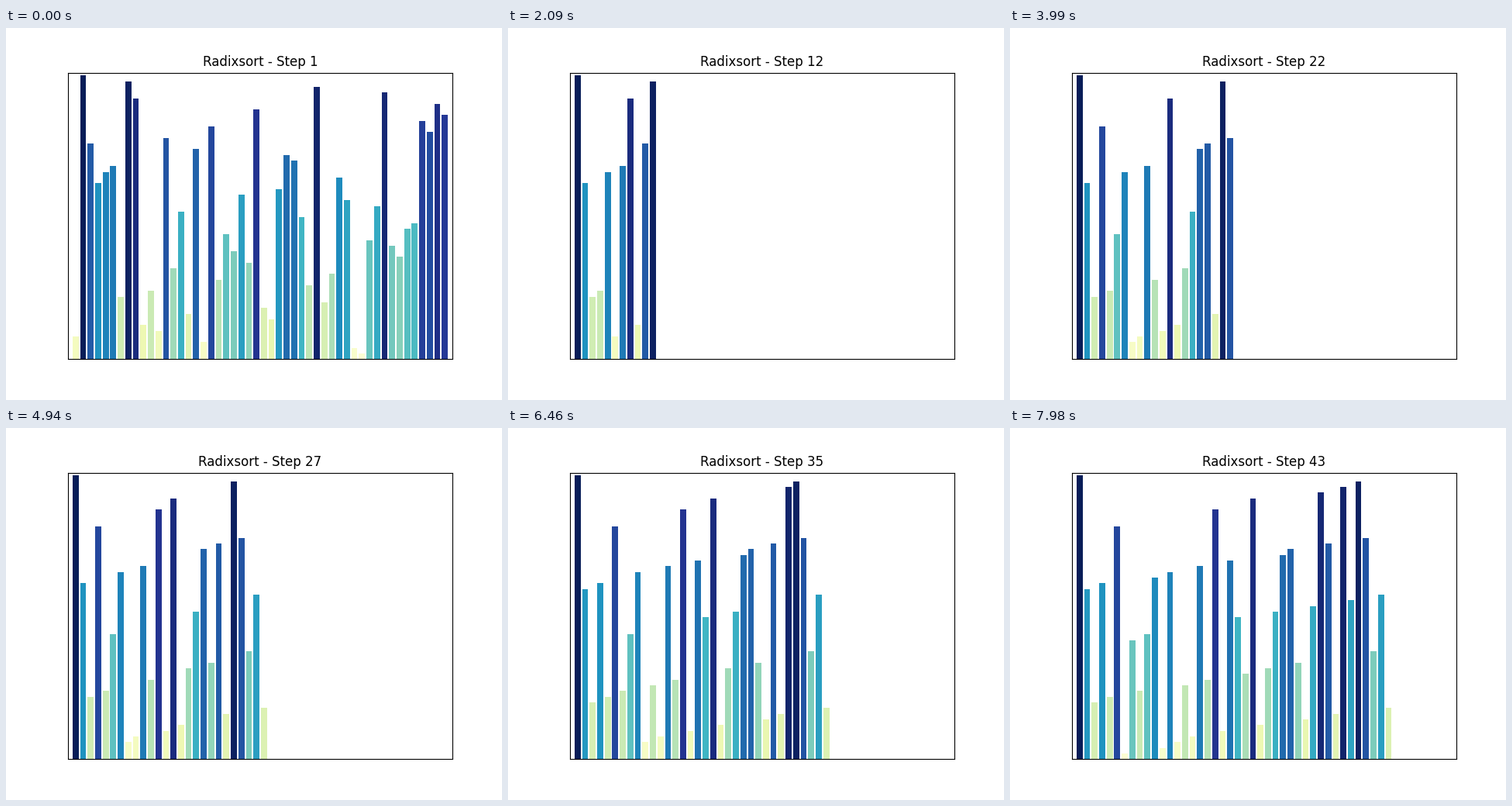
Recreate the animation shown at these times as a matplotlib script. Size 640 by 480 pixels, loop 8000 ms.

```python
import matplotlib.pyplot as plt
from matplotlib.animation import FuncAnimation

LOOP_MS = 8000
TICK_MS = 20
STEP_MS = 190

VALUES = [
    4, 50, 38, 31, 33, 34, 11, 49, 46, 6,
    12, 5, 39, 16, 26, 8, 37, 3, 41, 14,
    22, 19, 29, 17, 44, 9, 7, 30, 36, 35,
    25, 13, 48, 10, 15, 32, 28, 2, 1, 21,
    27, 47, 20, 18, 23, 24, 42, 40, 45, 43,
]
TOP = max(VALUES)
COUNT = len(VALUES)

fig, ax = plt.subplots(figsize=(6.4, 4.8), dpi=100)
ax.set(xlim=(-1, COUNT), ylim=(0, TOP * 1.01), xticks=[], yticks=[])
title = ax.set_title("")
bars = ax.bar(range(COUNT), VALUES, width=0.8)
cmap = plt.get_cmap("YlGnBu")


def bars_at(step):
    """Step 1 is the unsorted list; then one value per step joins its digit bucket."""
    if step == 1:
        return VALUES
    return sorted(VALUES[:step - 1], key=lambda v: v % 10)


def update(tick):
    step = (tick * TICK_MS + TICK_MS // 2) // STEP_MS + 1
    shown = bars_at(step)
    for i, bar in enumerate(bars):
        bar.set_visible(i < len(shown))
        if i < len(shown):
            bar.set_height(shown[i])
            bar.set_facecolor(cmap(shown[i] / TOP))
    title.set_text(f"Radixsort - Step {step}")
    return [*bars, title]


anim = FuncAnimation(fig, update, frames=LOOP_MS // TICK_MS, interval=TICK_MS,
                     init_func=lambda: update(0), repeat=True, repeat_delay=0)
plt.show()
```
